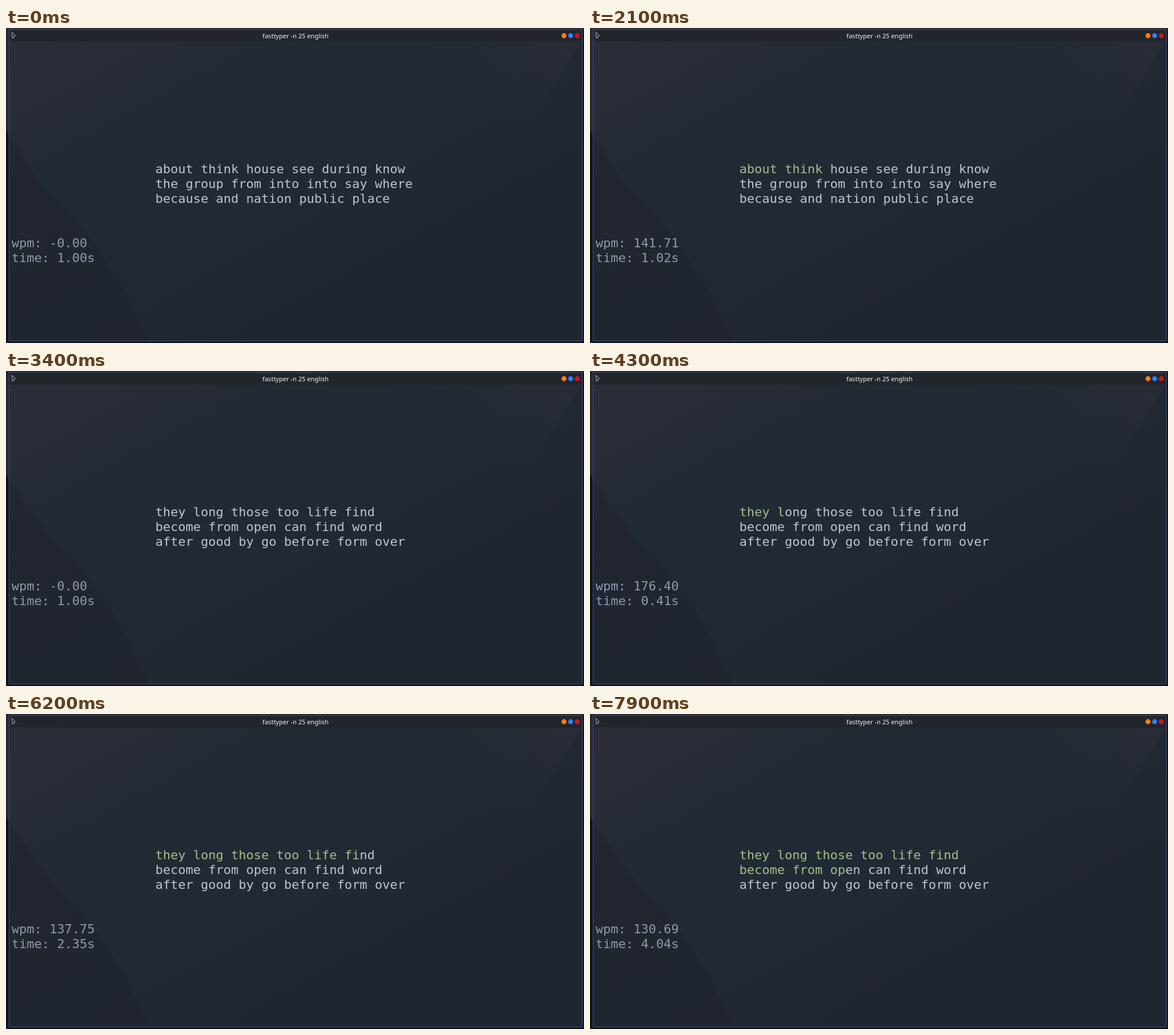
These frames come from a looping animation (1012x553 px, 8000 ms). An HTML page with a canvas:

```html
<!DOCTYPE html>
<html lang="en">
<head>
<meta charset="utf-8">
<title>Typing test</title>
<style>
  html, body { margin: 0; width: 100%; height: 100%; overflow: hidden; background: #0d141c; }
  canvas { display: block; }
</style>
</head>
<body>
<canvas id="stage" width="1012" height="553"></canvas>
<script>
const ctx = document.getElementById('stage').getContext('2d');
const LOOP = 8000, STEP = 100, COLS = 34, CELL = 13.245, ROW = 26;
const LEFT = 9.8, TEXT_LEFT = 261.6, TOP = 254.7;
const PLAIN = '#c0c5ce', GOOD = '#a3be8c', BAD = '#bf616a', STATUS = '#8e9bae';

// knots: [keys typed, seconds since the first key]
const rounds = [
  {
    shown: 0, start: 1070, good: 14,
    words: 'about think house see during know the group from into into say where because and nation public place',
    errors: 'sue_see',
    knots: [[1, 0], [12, 1.01616], [20, 1.63218], [21, 1.77]]
  },
  {
    shown: 3300, start: 3840, good: 99,
    words: 'they long those too life find become from open can find word after good by go before form over',
    errors: '',
    knots: [[1, 0], [6, 0.40816], [15, 1.13], [19, 1.63219], [24, 2.04], [27, 2.35209], [44, 4.0401]]
  }
];

function keyTime(knots, n) {
  const i = Math.max(1, knots.findIndex(k => k[0] >= n));
  const [n0, t0] = knots[i - 1], [n1, t1] = knots[i];
  return t0 + (t1 - t0) * (n - n0) / (n1 - n0);
}

function keysAt(knots, seconds) {
  const last = knots[knots.length - 1][0];
  let n = 0;
  while (n < last && keyTime(knots, n + 1) <= seconds + 1e-6) n++;
  return n;
}

function wrap(text) {
  const lines = [''];
  for (const word of text.split(' ')) {
    const line = lines[lines.length - 1];
    if (!line) lines[lines.length - 1] = word;
    else if (line.length + 1 + word.length <= COLS) lines[lines.length - 1] += ' ' + word;
    else lines.push(word);
  }
  return lines.slice(0, 3);
}

function write(text, x, y, color) {
  ctx.fillStyle = color;
  [...text].forEach((c, i) => ctx.fillText(c, x + i * CELL, y));
}

function shape(color, points, stroke) {
  ctx.beginPath();
  points.forEach(([x, y]) => ctx.lineTo(x, y));
  ctx.closePath();
  ctx.fillStyle = ctx.strokeStyle = color;
  stroke ? ctx.stroke() : ctx.fill();
}

function gradient(x0, y0, x1, y1, ...colors) {
  const g = ctx.createLinearGradient(x0, y0, x1, y1);
  colors.forEach((c, i) => g.addColorStop(i / (colors.length - 1), c));
  return g;
}

function drawWindow() {
  ctx.fillStyle = '#0d141c';
  ctx.fillRect(0, 0, 1012, 553);
  shape('#25272f', [[0, 0], [1012, 0], [1012, 3], [5, 3], [5, 188], [0, 180]]);
  ctx.fillStyle = gradient(120, 0, 420, 553, '#2a2d37', '#222a34', '#212a34', '#20262f');
  ctx.fillRect(5, 2, 1004, 548);
  shape(gradient(1008, 24, 860, 170, 'rgba(46,46,56,.6)', 'rgba(40,44,54,0)'),
    [[700, 24], [1008, 24], [930, 150], [860, 260]]);
  shape('rgba(31,35,43,.45)', [[5, 190], [60, 270], [140, 358], [205, 450], [250, 550], [5, 550]]);
  ctx.fillStyle = '#22252c';
  ctx.fillRect(5, 2, 1004, 22);

  ctx.strokeStyle = '#35436a';
  ctx.lineWidth = 1.6;
  ctx.beginPath();
  ctx.roundRect(5.5, 2.5, 1003.5, 547, 2);
  ctx.stroke();

  ctx.lineWidth = 1;
  shape('#b9bcc2', [[10.5, 7.5], [16.5, 13.5], [14, 14.3], [13.5, 17.5], [10.7, 17]], true);
  ['#ff7f0a', '#327dfa', '#cc1519'].forEach((color, i) => {
    ctx.fillStyle = color;
    ctx.beginPath();
    ctx.arc(977 + 11.6 * i, 13.5, 4.4, 0, 7);
    ctx.fill();
  });
  ctx.font = '11.05px "Noto Sans", "Open Sans", sans-serif';
  ctx.textAlign = 'center';
  ctx.fillStyle = '#f4f5f6';
  ctx.fillText('fasttyper -n 25 english', 507, 18);
  ctx.textAlign = 'left';
}

function drawRound(round, ms) {
  const { words, errors, knots } = round;
  const typed = keysAt(knots, (ms - round.start) / 1000);
  const good = Math.min(typed, round.good), bad = typed - good;
  const text = words.slice(0, good) + errors.slice(0, bad) + words.slice(good);

  ctx.font = '22px "DejaVu Sans Mono", monospace';
  let index = 0;
  wrap(text).forEach((line, row) => {
    const y = TOP + row * ROW;
    const a = Math.max(0, good - index), b = Math.max(0, typed - index);
    write(line.slice(0, a), TEXT_LEFT, y, GOOD);
    write(line.slice(a, b), TEXT_LEFT + a * CELL, y, BAD);
    write(line.slice(b), TEXT_LEFT + b * CELL, y, PLAIN);
    index += line.length + 1;
  });

  const seconds = typed ? keyTime(knots, typed) : 1;
  const wpm = !typed ? '-0.00' : (seconds ? good * 12 / seconds : 0).toFixed(2);
  write('wpm: ' + wpm, LEFT, TOP + 5 * ROW, STATUS);
  write('time: ' + seconds.toFixed(2) + 's', LEFT, TOP + 6 * ROW, STATUS);
}

const begin = performance.now();
function frame() {
  const elapsed = (performance.now() - begin) % LOOP;
  const ms = Math.floor(elapsed / STEP) * STEP;
  drawWindow();
  drawRound(rounds[ms < rounds[1].shown ? 0 : 1], ms);
  requestAnimationFrame(frame);
}
frame();
</script>
</body>
</html>
```
